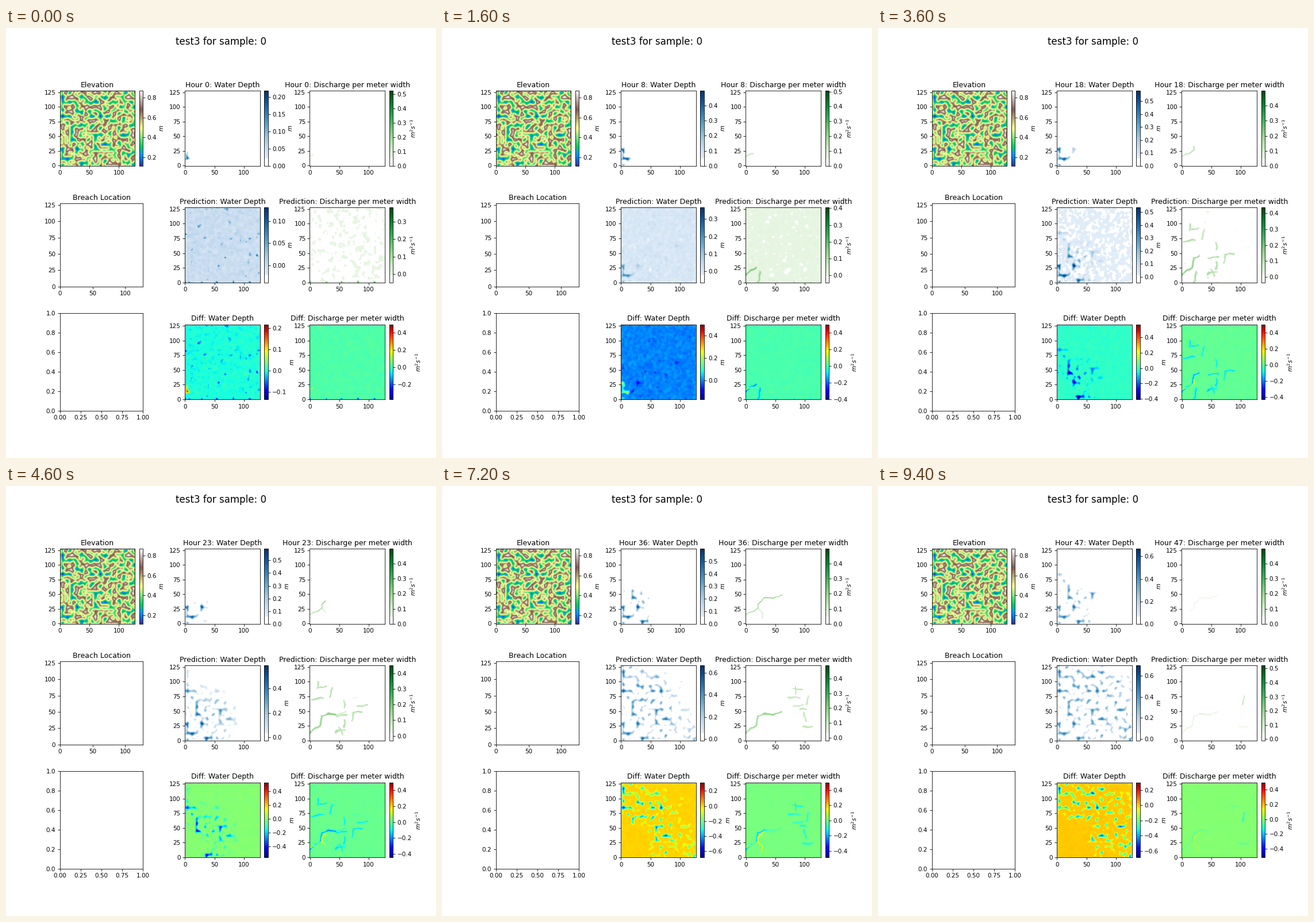
Animation of 748 by 748 pixels, one loop 9600 ms. Source, as a matplotlib script:

```python
import numpy as np
import matplotlib.pyplot as plt
from matplotlib.animation import FuncAnimation
from matplotlib.colors import ListedColormap
from mpl_toolkits.axes_grid1 import make_axes_locatable

SIZE, DPI, N, HOURS = 748, 75, 128, 48
BREACH = (0, 16)

# Deepest hollows of the terrain
HOLLOWS = [(5, 15), (15, 12), (2, 30), (20, 46), (32, 29), (37, 3), (62, 47),
           (62, 30), (78, 33), (88, 77), (32, 93), (4, 86), (6, 111), (70, 86)]
TRUE_ROUTE = [BREACH, (5, 19), (12, 21), (21, 25), (21, 33), (28, 38),
              (30, 44), (44, 45), (61, 48)]
SIDE_ROUTE = [(21, 25), (28, 20), (28, 10)]
PRED_ROUTE = [(0, 10), (8, 21), (18, 24), (20, 42), (28, 45), (44, 45),
              (60, 48)]

rng = np.random.default_rng(7)
Y, X = np.mgrid[:N, :N].astype(float)


def smooth_noise(gen, sigma):
    f = np.fft.fftfreq(N)
    kernel = np.exp(-2 * (np.pi * sigma) ** 2 * (f[:, None] ** 2 + f ** 2))
    field = np.fft.ifft2(np.fft.fft2(gen.normal(size=(N, N))) * kernel).real
    return (field - field.mean()) / field.std()


def bump(h, center, width):
    return np.exp(-((h - center) / width) ** 2)


def step(h, center, width):
    return 1 / (1 + np.exp((center - h) / width))


def terrain(cell=8):
    """Gradient noise whose slopes lean down towards the hollows."""
    n = N // cell + 1
    gy, gx = np.mgrid[:n, :n] * float(cell)
    angle = rng.uniform(0, 2 * np.pi, (n, n))
    vx, vy = .5 * np.cos(angle), .5 * np.sin(angle)
    for x, y in HOLLOWS:
        dx, dy = gx - x, gy - y
        pull = np.exp(-(dx ** 2 + dy ** 2) / 60) / 4
        vx += pull * dx
        vy += pull * dy
    norm = np.hypot(vx, vy)
    vx, vy = vx / norm, vy / norm

    ix, iy = (X // cell).astype(int), (Y // cell).astype(int)
    fx, fy = X / cell - ix, Y / cell - iy
    sx, sy = (f ** 3 * (f * (6 * f - 15) + 10) for f in (fx, fy))

    def corner(i, j):
        return vx[iy + j, ix + i] * (fx - i) + vy[iy + j, ix + i] * (fy - j)

    low = corner(0, 0) * (1 - sx) + corner(1, 0) * sx
    high = corner(0, 1) * (1 - sx) + corner(1, 1) * sx
    return .5 + .58 * (low * (1 - sy) + high * sy)


elevation = terrain()
capacity = 1.8 * np.clip(.44 - elevation, 0, None)

# Hour at which the water reaches each cell
distance = np.hypot(X - BREACH[0], Y - BREACH[1])
distance *= 1 + .08 * smooth_noise(rng, 7)
true_arrival = .8 * distance - 7
pred_arrival = 1 + .15 * distance + (distance / 32) ** 2

WX = X + .9 * smooth_noise(rng, 3)
WY = Y + .9 * smooth_noise(rng, 3)


def stroke(a, b, radius):
    """Soft line from a to b, a round blob when both are the same."""
    dx, dy = b[0] - a[0], b[1] - a[1]
    t = ((WX - a[0]) * dx + (WY - a[1]) * dy) / max(dx * dx + dy * dy, 1e-9)
    t = np.clip(t, 0, 1)
    d2 = (WX - a[0] - t * dx) ** 2 + (WY - a[1] - t * dy) ** 2
    return np.exp(-d2 / radius ** 2)


def route(points, start, pace, power, radius):
    """Segments of a stream as (map, first hour, last hour)."""
    return [(power * stroke(a, b, radius), start + i * pace, HOURS)
            for i, (a, b) in enumerate(zip(points, points[1:]))]


def streaks(count):
    """Short upright or level streams that come and go with the front."""
    result = []
    for i in range(count):
        x, y = rng.uniform(8, 108), rng.uniform(6, 104)
        along, across = rng.uniform(5, 9), rng.uniform(-2, 2)
        dx, dy = (along, across) if i % 2 else (across, along)
        start = pred_arrival[int(y), int(x)] - 2
        line = stroke((x - dx, y - dy), (x + dx, y + dy), 1.2)
        result.append((.14 * line, start, start + 18))
    return result


true_streams = (route(TRUE_ROUTE, 0, 5, .2, 1.1)
                + route(SIDE_ROUTE, 22, 2, .13, 1))
pred_streams = route(PRED_ROUTE, 1, 4.5, .2, 1.5) + streaks(20)
source = stroke(BREACH, BREACH, 1.3)
edge = sum(stroke((x, 0), (x, 0), 1.6) for x in range(1, N, 27))


def depth(arrival, hour, fill):
    return capacity * np.clip((hour - arrival) / fill, 0, 1)


def flow(streams, hour):
    return np.max([field * np.clip((hour - first + 1) / 1.5, 0, 1)
                   * np.clip((last - hour) / 3, 0, 1)
                   for field, first, last in streams], axis=0)


def spots(gen, hour):
    return .05 * np.exp(-hour / 15) * np.clip(smooth_noise(gen, 1.9) - 1.7, 0, 2)


def fields(h):
    gen = np.random.default_rng(100 + h)
    leak = np.exp(-h / 7) * edge
    td = depth(true_arrival, h, 7)
    tf = np.maximum(flow(true_streams, h), .5 * source)

    pd = depth(pred_arrival, h, 12) + .11 * leak + spots(gen, h)
    pd += .012 * bump(h, 18, 6)
    pd += (.003 + .006 * bump(h, 11, 8)) * smooth_noise(gen, 1.6)

    pf = np.maximum(flow(pred_streams, h), .4 * source * min(h / 8, 1))
    pf += .28 * leak + (spots(gen, h) if h > 8 else 0)
    pf += .015 * bump(h, 8, 3) - .012 * np.exp(-h / 20)
    pf += .005 * np.exp(-h / 40) * smooth_noise(gen, 1.8)
    return {"true_depth": td, "true_flow": tf,
            "pred_depth": pd, "pred_flow": pf,
            "diff_depth": td - pd, "diff_flow": tf - pf}


def limits(h):
    filled = .6 * (1 - np.exp(-(h + 2.7) / 6))
    guess = .38 + .003 * h
    return {"true_depth": (0, filled + .07 * step(h, 43, 1)),
            "true_flow": (0, .498 + .025 * np.exp(-h / 7)),
            "pred_depth": (-.017 - .05 * bump(h, 10, 11),
                           .13 + .6 * (1 - np.exp(-h / 16))),
            "pred_flow": (.0008 * h - .05, guess),
            "diff_depth": (-.13 - .56 * step(h, 18, 4),
                           filled - .3 * step(h, 27, 3)),
            "diff_flow": (-guess, .5)}


def white_based(name):
    colors = plt.get_cmap(name)(np.linspace(0, 1, 256))
    colors[:25] = 1
    return ListedColormap(colors)


def panel(ax, title, cmap, unit, data, lo=0, hi=1):
    image = ax.imshow(data, origin="lower", cmap=cmap, vmin=lo, vmax=hi)
    ax.set_title(title)
    cax = make_axes_locatable(ax).append_axes("right", size="5%", pad=.1)
    fig.colorbar(image, cax=cax).set_label(unit)
    return image


plt.rcParams["font.family"] = "DejaVu Sans"
fig, axes = plt.subplots(3, 3, figsize=(SIZE / DPI, SIZE / DPI), dpi=DPI)
fig.subplots_adjust(left=.125, right=.9, bottom=.11, top=.88,
                    wspace=.5, hspace=.2)
fig.suptitle("test3 for sample: 0", fontsize=16)

blank = np.zeros((N, N))
panel(axes[0, 0], "Elevation", "terrain", "$m$", elevation, .117, .866)
axes[1, 0].imshow(blank, origin="lower", cmap=white_based("Blues"))
axes[1, 0].set_title("Breach Location")

images = {}
for row, (key, label) in enumerate([("true", "Hour 0"), ("pred", "Prediction"),
                                    ("diff", "Diff")]):
    for col, (kind, name, cmap, unit) in enumerate([
            ("depth", "Water Depth", "Blues", "$m$"),
            ("flow", "Discharge per meter width", "Greens", "$m^2s^{-1}$")]):
        images[f"{key}_{kind}"] = panel(
            axes[row, col + 1], f"{label}: {name}",
            "jet" if key == "diff" else white_based(cmap), unit, blank)


def update(hour):
    data, ranges = fields(hour), limits(hour)
    for key, image in images.items():
        image.set_data(data[key])
        image.set_clim(*ranges[key])
    axes[0, 1].set_title(f"Hour {hour}: Water Depth")
    axes[0, 2].set_title(f"Hour {hour}: Discharge per meter width")
    return list(images.values())


anim = FuncAnimation(fig, update, frames=HOURS, interval=200,
                     repeat=True, repeat_delay=0, blit=False)
plt.show()
```
